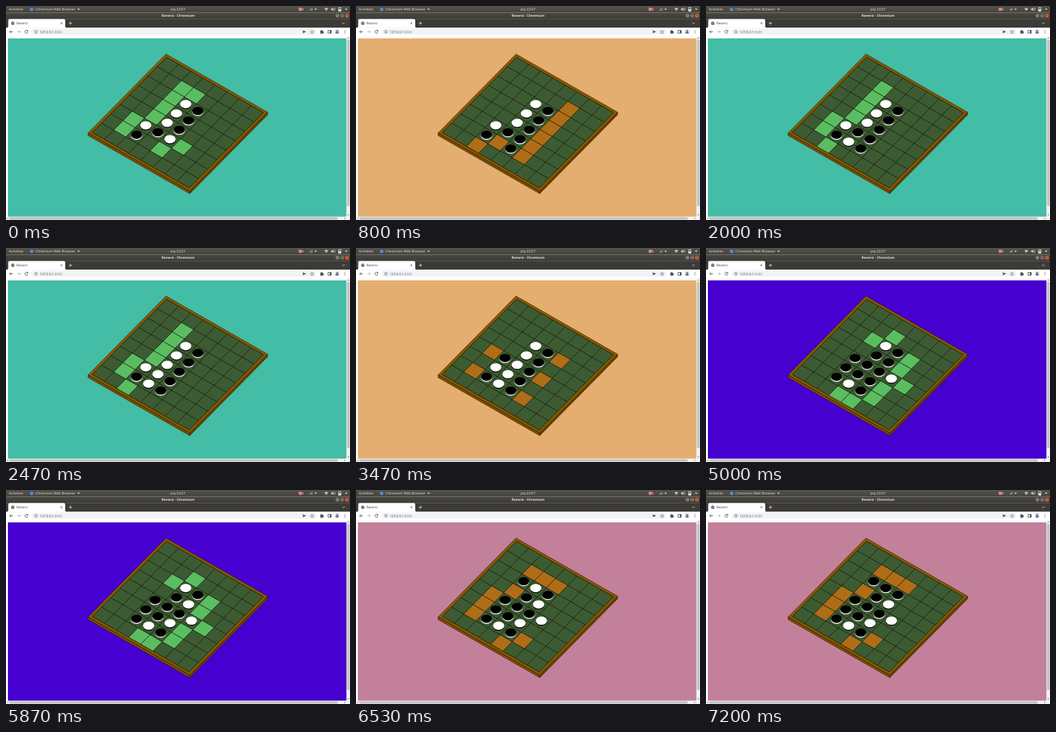
Animation, 540 px wide and 337 px high, one loop 8000 ms. Source, as an HTML page:

```html
<!DOCTYPE html>
<html lang="en">
<head>
<meta charset="utf-8">
<title>Reversi</title>
<style>
  html, body { margin: 0; width: 100%; height: 100%; overflow: hidden; background: #fff; }
  svg { display: block; width: 100vw; height: 100vh; }
  text { font-family: "Open Sans", "Noto Sans", sans-serif; font-size: 5.5px; fill: #e4e1d8; }
  .bold { font-weight: 700; font-size: 5.3px; }
  .ink { fill: #3c4043; font-size: 5.2px; }
  .line { fill: none; stroke: #50555a; stroke-width: .9; }
  .pale { fill: none; stroke: #dfdcd4; stroke-width: .9; }
</style>
</head>
<body>
<svg viewBox="0 0 540 337" preserveAspectRatio="none">
  <defs>
    <linearGradient id="panel" x2="0" y2="1">
      <stop offset="0" stop-color="#56534b"/><stop offset="1" stop-color="#45433c"/>
    </linearGradient>
    <linearGradient id="title" x2="0" y2="1">
      <stop offset="0" stop-color="#4a4841"/><stop offset="1" stop-color="#3c3b37"/>
    </linearGradient>
  </defs>

  <!-- desktop panel -->
  <rect width="540" height="10.5" fill="url(#panel)"/>
  <text x="4.5" y="7.2">Activities</text>
  <circle cx="40.3" cy="5.2" r="2.8" fill="#4a8ae0"/>
  <text x="46" y="7.2">Chromium Web Browser</text>
  <path d="M112 4.2h4l-2 2.4z" fill="#e4e1d8"/>
  <text x="270" y="7.2" text-anchor="middle">pią 22:07</text>
  <rect x="459.5" y="2.8" width="5" height="4.8" rx=".6" fill="#e3868a"/>
  <path d="M464.3 5.2l2.6-2v4z" fill="#e3868a"/>
  <text x="477" y="7.2">pl</text>
  <path d="M484 4.2h4l-2 2.4z" fill="#e4e1d8"/>
  <path d="M499.8 4.2q3-2.8 6 0l-3 3.8z" fill="#b9b6ae"/>
  <path d="M510.3 4.2h1.4l1.8-1.6v5.2l-1.8-1.6h-1.4z" fill="#dfdcd4"/>
  <path class="pale" d="M514.5 3.4q1.2 1.8 0 3.6M515.8 2.6q1.7 2.6 0 5.2" style="stroke-width:.6"/>
  <rect class="pale" x="522" y="2.6" width="3.8" height="5.6"/>
  <path d="M522 5h3.8v3h-3.8z" fill="#dfdcd4"/>
  <path d="M532 4.2h4l-2 2.4z" fill="#e4e1d8"/>

  <!-- window title and tabs -->
  <rect y="10.5" width="540" height="10" fill="url(#title)"/>
  <text class="bold" x="270" y="17.4" text-anchor="middle">Reversi - Chromium</text>
  <circle cx="520.3" cy="15.2" r="2.8" fill="#8a867c"/>
  <path d="M519 15.6h2.6" stroke="#3c3b37" stroke-width=".7"/>
  <circle cx="527.7" cy="15.2" r="2.8" fill="#8a867c"/>
  <rect x="526.6" y="14.1" width="2.2" height="2.2" fill="none" stroke="#3c3b37" stroke-width=".6"/>
  <circle cx="535.2" cy="15.2" r="3" fill="#e4602f"/>
  <path d="M534.1 14.1l2.2 2.2m0-2.2l-2.2 2.2" stroke="#4b2414" stroke-width=".6"/>
  <rect y="20.3" width="540" height="14" fill="#3c3b37"/>
  <path d="M1 34.3q2.5 0 2.5-2.5V23q0-2.5 2.5-2.5h84.500q2.5 0 2.5 2.500v8.800q0 2.500 2.500 2.500z" fill="#fff"/>
  <circle cx="10.700" cy="27.200" r="2.600" fill="#5a5f64"/>
  <path d="M9 26.500l1.600.8.3 1.400M11.500 25.300l.6 1.200 1 .2" fill="none" stroke="#fff" stroke-width=".6"/>
  <text class="ink" x="16.300" y="29">Reversi</text>
  <path class="line" d="M85.500 25.700l3 3m0-3l-3 3" style="stroke-width:.8"/>
  <path class="pale" d="M98.700 27.200h5m-2.500-2.500v5"/>
  <path class="pale" d="M527.800 26.200l1.900 1.900 1.900-1.900"/>

  <!-- toolbar -->
  <rect y="34.200" width="540" height="13" fill="#fff"/>
  <rect x="40" y="35.900" width="447.500" height="9.400" rx="4.700" fill="#f1f3f4"/>
  <path class="line" d="M11 40.600H5.800m2.400-2.400l-2.400 2.400 2.400 2.400"/>
  <path class="line" d="M17.500 40.600h5.200m-2.400-2.400l2.400 2.400-2.400 2.400" style="stroke:#aeb1b4"/>
  <path class="line" d="M34 39a2.400 2.400 0 1 0 .4 2.300"/>
  <path d="M34.700 37.700v2.600h-2.600z" fill="#50555a"/>
  <circle class="line" cx="47" cy="40.600" r="2.200" style="stroke-width:.6"/>
  <path d="M47 40.300v1.500M47 39.200v.6" stroke="#50555a" stroke-width=".6"/>
  <text class="ink" x="53" y="42.500">127.0.0.1<tspan fill="#85898d">:8080</tspan></text>
  <path d="M465.500 38.200l5.800 2.400-5.800 2.400.8-2.400z" fill="#50555a"/>
  <path class="line" d="M480.500 38l.8 1.800 2 .2-1.500 1.300.5 2-1.800-1.100-1.800 1.100.5-2-1.500-1.300 2-.2z" style="stroke-width:.6"/>
  <path d="M493 39h1.500q0-1.300 1-1.300t1 1.300h1.500v1.400q1.200 0 1.200 1t-1.200 1v1.200h-5v-1.400q1 0 1-.9t-1-.9z" fill="#50555a"/>
  <rect class="line" x="505.500" y="38.400" width="5" height="4.500"/>
  <path d="M508.300 38.400h2.200v4.500h-2.200z" fill="#50555a"/>
  <circle cx="519.800" cy="40.600" r="4" fill="#d5dcf2"/>
  <circle cx="519.800" cy="39.500" r="1.300" fill="#44506b"/>
  <path d="M517.300 43q0-2 2.500-2t2.500 2z" fill="#44506b"/>
  <path d="M532 38v1.100m0 1v1.100m0 1v1.100" stroke="#50555a" stroke-width="1.100"/>

  <!-- page -->
  <rect y="47.200" width="540" height="290" fill="#fff"/>
  <rect id="page" x="3" y="51" width="531.500" height="280.700"/>
  <rect x="534.800" y="47.500" width="5.200" height="289.500" fill="#f3f3f3"/>
  <rect y="332" width="540" height="5" fill="#f3f3f3"/>
  <rect x="535.400" y="53.500" width="4" height="261.500" fill="#c3c3c3"/>
  <rect x="5.500" y="332.600" width="515" height="3.900" fill="#c3c3c3"/>
  <path d="M536 51.300l1.400-1.700 1.400 1.700zM536 328.200l1.400 1.700 1.400-1.700zM3.400 333.200l-1.600 1.400 1.600 1.400zM531 333.200l1.600 1.400-1.600 1.400z" fill="#6b6b6b"/>

  <g id="board" stroke-linejoin="round"></g>
  <g id="marks" stroke="#10180d" stroke-width=".7"></g>
  <g id="discs"></g>
</svg>
<script>
const LOOP = 8000;
const ORIGIN = [252, 80.8], U = [19, 10.9], V = [-14.55, 14.8];
const RIM = .2, DEPTH = 4;
const RADIUS = 8.8, THICK = 2.1, TILT = .83, LIFT = 5;
const GREEN = '#5bbd61', ORANGE = '#b06d17';

// Cells are two digits: column, row. Flips run from..to, with a delay between discs.
const START = { white: '32 33 34 25 45', black: '42 43 44 35 26' };
const TURNS = [
  { at: 0, bg: '#43bda5', mark: GREEN, open: '21 31 22 23 24 15 16 46 55' },
  { at: 470, bg: '#e3ae70', mark: ORANGE, open: '51 52 53 54 55 56 36 27',
    side: 'black', put: '46', flip: '45', from: 560, to: 800 },
  { at: 2000, bg: '#43bda5', mark: GREEN, open: '21 22 23 24 15 16 27',
    side: 'white', put: '36', flip: '35', from: 2230, to: 2470 },
  { at: 3470, bg: '#e3ae70', mark: ORANGE, open: '14 16 52 54 56',
    side: 'black', put: '24', flip: '25 34 33 35', from: 4030, to: 4470, lag: 50 },
  { at: 5000, bg: '#4600cf', mark: GREEN, open: '22 31 52 53 64 55 56 37 47',
    side: 'white', put: '54', flip: '43 45', from: 5630, to: 5870 },
  { at: 6530, bg: '#c3809a', mark: ORANGE, open: '21 31 41 23 14 15 16 47 56',
    side: 'black', put: '22', flip: '32', from: 6960, to: 7200 }
];

const $ = id => document.getElementById(id);
const list = s => s.split(' ');
const point = (i, j, drop = 0) => [
  ORIGIN[0] + i * U[0] + j * V[0],
  ORIGIN[1] + i * U[1] + j * V[1] + drop
];
const other = side => side === 'black' ? 'white' : 'black';
const fill = { black: '#000', white: '#fff' };

function add(parent, tag, attrs) {
  const el = document.createElementNS('http://www.w3.org/2000/svg', tag);
  for (const k in attrs) el.setAttribute(k, attrs[k]);
  return parent.appendChild(el);
}
const poly = (parent, pts, attrs) =>
  add(parent, 'polygon', { points: pts.map(p => p.join()).join(' '), ...attrs });

function buildBoard() {
  const g = $('board'), a = -RIM, b = 8 + RIM;
  const edge = { stroke: '#1c1200', 'stroke-width': .6 };
  poly(g, [point(a, b), point(b, b), point(b, b, DEPTH), point(a, b, DEPTH)], { fill: '#7a4d00', ...edge });
  poly(g, [point(b, a), point(b, b), point(b, b, DEPTH), point(b, a, DEPTH)], { fill: '#6a4200', ...edge });
  poly(g, [point(a, a), point(b, a), point(b, b), point(a, b)], { fill: '#865700', ...edge });
  poly(g, [point(0, 0), point(8, 0), point(8, 8), point(0, 8)], { fill: '#3d5b32' });
  let d = '';
  for (let k = 0; k <= 8; k++) d += `M${point(k, 0)}L${point(k, 8)}M${point(0, k)}L${point(8, k)}`;
  add(g, 'path', { d, fill: 'none', stroke: '#0c140a', 'stroke-width': .8 });
}

function drawMarks(turn) {
  const g = $('marks');
  g.textContent = '';
  for (const c of list(turn.open)) {
    const i = +c[0], j = +c[1];
    poly(g, [point(i, j), point(i + 1, j), point(i + 1, j + 1), point(i, j + 1)], { fill: turn.mark });
  }
}

// p is the progress of a half turn: 0 shows `side`, 1 shows the other face.
function drawDisc(g, cell, side, p) {
  const [x, y] = point(+cell[0] + .5, +cell[1] + .5, -.8 - LIFT * Math.sin(Math.PI * p));
  const angle = TILT + Math.PI * p;
  const ry = RADIUS * Math.abs(Math.sin(angle));
  const shift = THICK / 2 * Math.cos(angle);
  const faces = [[other(side), y + shift], [side, y - shift]];
  if (Math.sin(angle) < 0) faces.reverse();
  for (const [name, cy] of faces)
    add(g, 'ellipse', { cx: x, cy, rx: RADIUS, ry: Math.max(ry, .5), fill: fill[name] });
}

function discsAt(t) {
  const discs = {};
  for (const side in START) for (const c of list(START[side])) discs[c] = [side, 0];
  for (const turn of TURNS) {
    if (t < turn.at || !turn.put) continue;
    discs[turn.put] = [turn.side, 0];
    const cells = list(turn.flip), lag = turn.lag || 0;
    const span = turn.to - turn.from - lag * (cells.length - 1);
    cells.forEach((c, n) => {
      const p = (t - turn.from - n * lag) / span;
      discs[c] = p >= 1 ? [turn.side, 0] : [other(turn.side), Math.max(p, 0)];
    });
  }
  return discs;
}

let shown = null;
function render(t) {
  const turn = TURNS.filter(s => s.at <= t).pop();
  if (turn !== shown) {
    shown = turn;
    $('page').setAttribute('fill', turn.bg);
    drawMarks(turn);
  }
  const g = $('discs'), discs = discsAt(t);
  g.textContent = '';
  const depth = c => point(+c[0], +c[1])[1];
  for (const c of Object.keys(discs).sort((a, b) => depth(a) - depth(b))) drawDisc(g, c, ...discs[c]);
}

buildBoard();
render(0);
const begin = performance.now();
function tick() {
  render((performance.now() - begin) % LOOP);
  requestAnimationFrame(tick);
}
requestAnimationFrame(tick);
</script>
</body>
</html>
```
